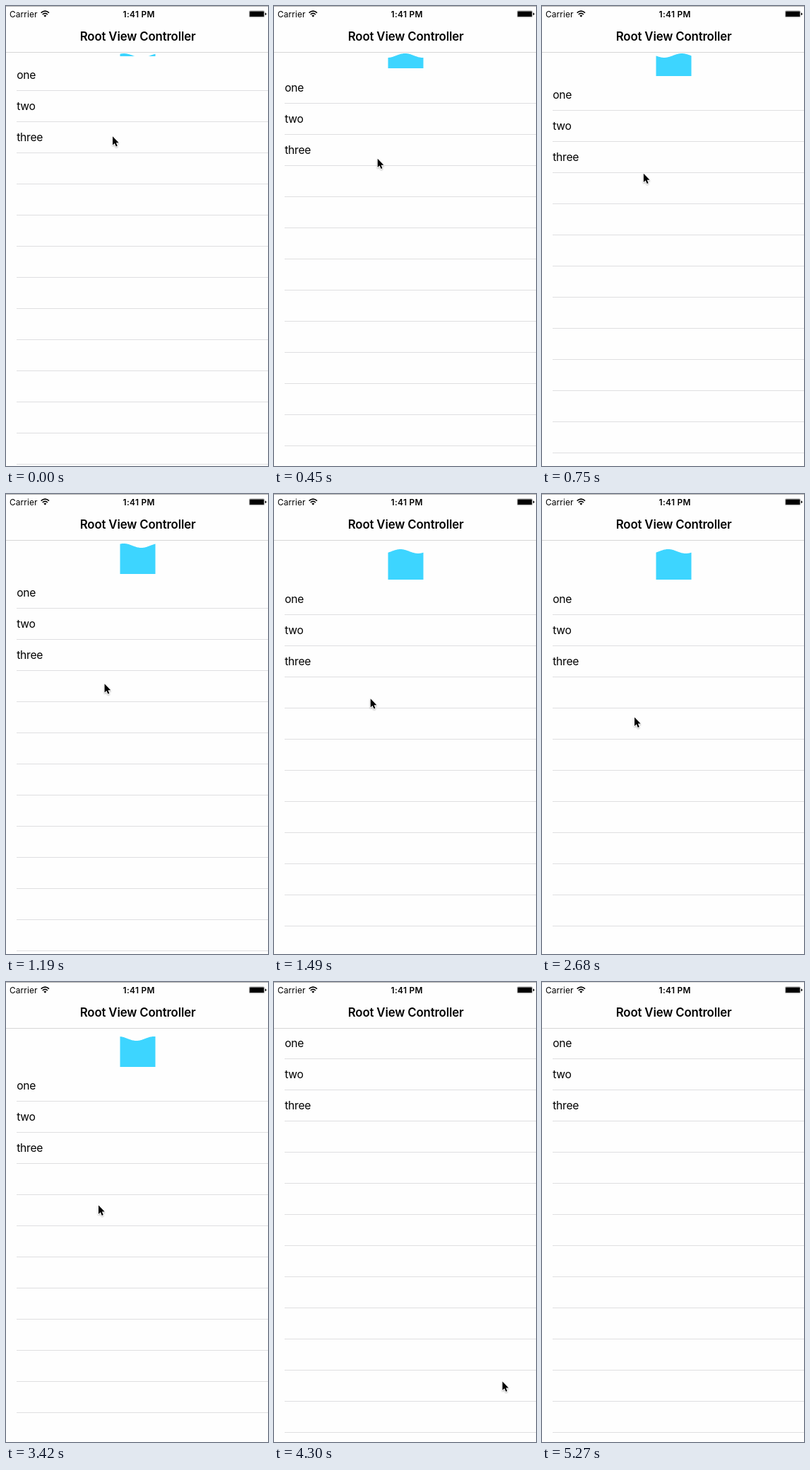
An HTML page for the animation above (5.33 s loop, 371 by 650 pixels).

```html
<!DOCTYPE html>
<html lang="en">
<head>
<meta charset="utf-8">
<title>Pull to refresh</title>
<style>
  html, body { margin: 0; width: 100%; height: 100%; overflow: hidden; background: #fefefe; }
  svg { display: block; width: 371px; height: 650px; }
  text { font-family: Inter, Roboto, sans-serif; fill: #000; }
  .row { font-size: 15.6px; letter-spacing: -0.22px; }
  .title { font-size: 16.8px; font-weight: 600; letter-spacing: -0.14px; }
  .status { font-size: 11.87px; letter-spacing: 0.1px; }
  .clock { font-size: 11.87px; font-weight: 600; letter-spacing: 0.35px; }
</style>
</head>
<body>
<svg viewBox="0 0 371 650">
  <defs>
    <filter id="soft" x="-50%" y="-50%" width="200%" height="200%">
      <feGaussianBlur stdDeviation="0.9"/>
    </filter>
    <path id="arrow" d="M0 0V12.4L2.8 9.8L4.8 14.4L6.8 13.5L4.9 9.1H8.7Z"/>
  </defs>
  <rect width="371" height="650" fill="#fefefe"/>
  <path id="wave" fill="#3dd5ff"/>
  <g id="list"></g>

  <rect width="371" height="65" fill="#fefefe"/>
  <rect y="65" width="371" height="1" fill="#d6d6d6"/>
  <rect id="edge" width="371" height="1"/>
  <text class="status" x="5" y="15.7">Carrier</text>
  <g fill="none" stroke="#000" stroke-width="1.6">
    <path d="M49.6 9.7Q55.3 4.6 61 9.7"/>
    <path d="M51.7 12Q55.3 8.8 58.9 12"/>
  </g>
  <path d="M53.3 13.6Q55.3 11.9 57.3 13.6L55.3 15.8Z"/>
  <text class="clock" x="188.2" y="15.7" text-anchor="middle">1:41 PM</text>
  <rect x="344.3" y="6.8" width="21.6" height="9" rx="1.6" fill="#fefefe" stroke="#000" stroke-width="0.5" stroke-opacity="0.6"/>
  <rect x="345" y="7.5" width="20.2" height="7.6" rx="0.9"/>
  <path d="M366.8 9.6Q368.6 9.9 368.6 11.3T366.8 13Z"/>
  <text class="title" x="186.6" y="49" text-anchor="middle">Root View Controller</text>

  <g id="cursor">
    <use href="#arrow" y="1.4" fill="#000" stroke="#000" opacity="0.4" filter="url(#soft)"/>
    <use href="#arrow" fill="#000" stroke="#fff" stroke-width="2" paint-order="stroke" stroke-linejoin="round"/>
  </g>
</svg>
<script>
const LOOP = 5330, STEP = 148.1;
const DRAG_END = 14, RELEASE = 16, HIDE = 23.67, LEAVE = 27;
const REST = 60.3;
const $ = id => document.getElementById(id);
const wave = $('wave'), list = $('list'), cursor = $('cursor'), edge = $('edge');

const clamp = u => Math.min(1, Math.max(0, u));
const lerp = (a, b, u) => a + (b - a) * u;
const easeOut = u => 1 - (1 - clamp(u)) ** 2;
const easeInOut = u => (u = clamp(u), u * u * (3 - 2 * u));

// The list resists the drag, springs to rest, then closes
function pull(k) {
  const d = Math.min(k, DRAG_END);
  const dragged = 11 + 6.25 * d - 0.12 * d * d;
  const held = lerp(dragged, REST, easeOut((k - RELEASE) / 3));
  return lerp(held, 0, easeInOut((k - HIDE) / 2));
}

// The pointer drags down, waits, then leaves at the lower right
function pointer(k) {
  const d = Math.min(k, DRAG_END), m = Math.max(0, k - LEAVE);
  return [
    151 - 1.43 * d + 205 * (1 - 0.247 ** m),
    184.2 + Math.min(10.5 * d, 131.3) + 353 * (1 - 0.543 ** m)
  ];
}

function wavePath(offset, k) {
  const left = 161.5, width = 50, bottom = offset + 60;
  const level = Math.max(70, offset + 20), crest = 5.5 + 6.2 * k;
  let d = `M${left} ${bottom}`;
  for (let x = 0; x <= width; x++) {
    const y = level - 3 * Math.cos((x - crest) / width * 2 * Math.PI);
    d += `L${left + x} ${Math.min(y, bottom).toFixed(2)}`;
  }
  return d + `V${bottom}Z`;
}

function buildRows(labels) {
  let rows = '';
  for (let i = 0; i < 13; i++) {
    const y = 108 + 44 * i;
    rows += `<rect x="15" y="${y}" width="356" height="1" fill="#dfdfe1"/>`;
    if (labels[i]) rows += `<text class="row" x="15.2" y="${y - 16}">${labels[i]}</text>`;
  }
  list.innerHTML = rows;
}

function draw(t) {
  const k = Math.floor(t / STEP);
  const offset = pull(k);
  const [x, y] = pointer(k);
  list.setAttribute('transform', `translate(0 ${Math.round(offset)})`);
  wave.setAttribute('d', wavePath(Math.floor(offset), k));
  cursor.setAttribute('transform', `translate(${x} ${y})`);
  edge.setAttribute('fill', t < 5270 ? '#b0b0b0' : '#d8d8d8');
}

function tick() {
  draw(performance.now() % LOOP);
  requestAnimationFrame(tick);
}
buildRows(['one', 'two', 'three']);
tick();
</script>
</body>
</html>
```
